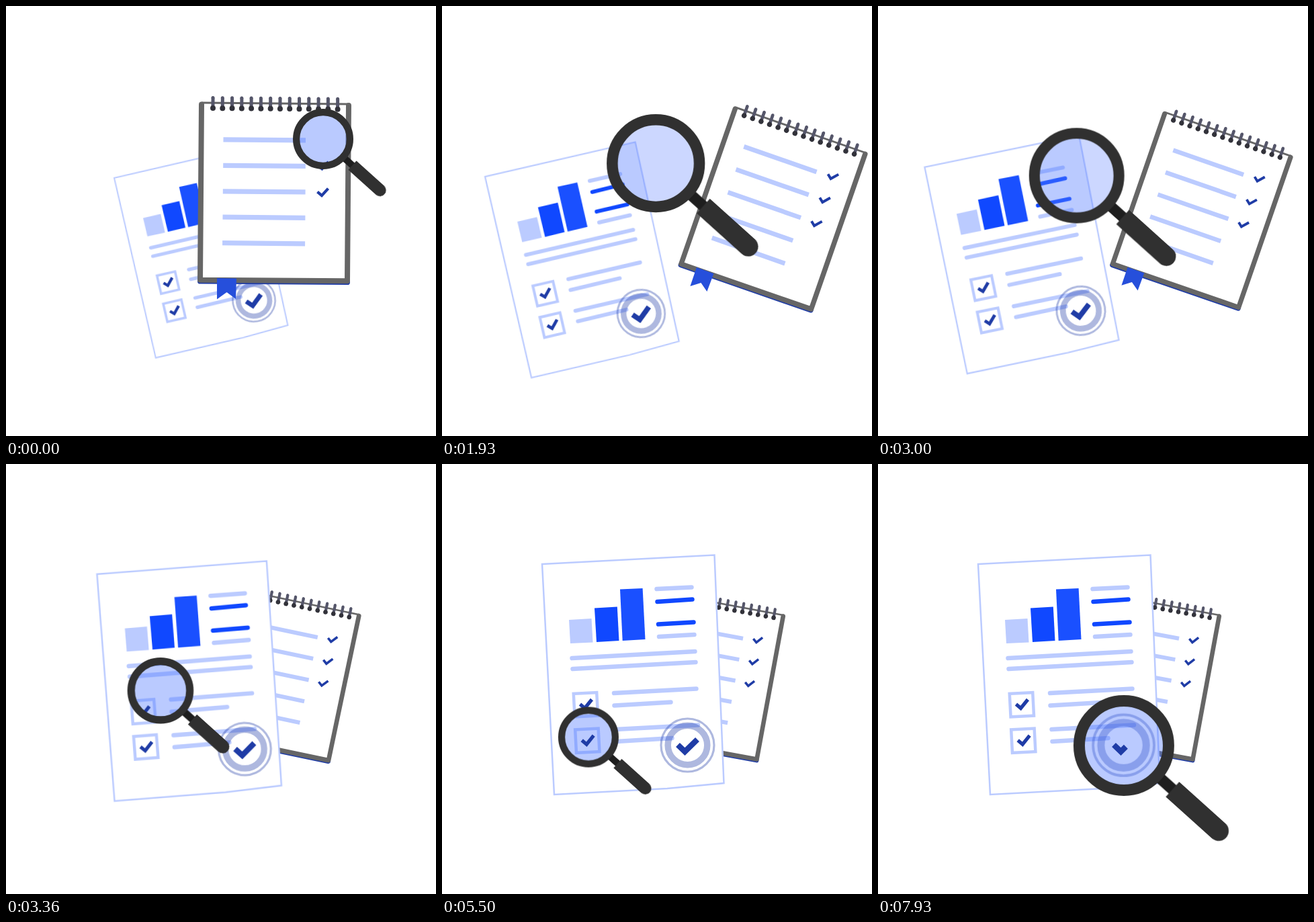
Recreate the animation shown at these times as an HTML page. Size 640x640 px, loop 8000 ms.

```html
<!DOCTYPE html>
<html lang="en">
<head>
<meta charset="utf-8">
<title>Document review</title>
<style>
  :root {
    --light: #bbcbff;
    --blue: #1048ff;
    --navy: #1f3ca6;
    --ease: cubic-bezier(.75, 0, 0, 1);
  }
  html, body { margin: 0; width: 100%; height: 100%; overflow: hidden; background: #fff; }
  svg { position: absolute; inset: 0; width: 100%; height: 100%; }
  path, circle { fill: none; }

  /* stacking */
  #notebookLayer { animation: stack 8s step-end infinite; }
  #paperLayer { z-index: 2; }
  #tintLayer { z-index: 4; opacity: .4; }
  #tickLayer { z-index: 5; }
  #lensLayer { z-index: 6; }
  @keyframes stack { 0% { z-index: 3 } 31%, 100% { z-index: 1 } }

  /* motion */
  .paper { transform-origin: 284.25px 312px; animation: paper 8s infinite var(--ease); }
  @keyframes paper {
    0%, 11.19% { transform: translate(6px, 53.5px) rotate(-10deg) scale(.8) }
    31% { transform: translate(-81.3px, 65.3px) rotate(-10deg) scale(.9) }
    51.375%, 100% { transform: translate(0px, 0px) rotate(0deg) scale(1) }
  }

  .notebook {
    transform-origin: 399.4px 278.3px;
    animation: bookMove 8s infinite var(--ease), bookTurn 8s infinite var(--ease), bookSize 8s infinite var(--ease);
  }
  @keyframes bookMove {
    0% { translate: 0px 0px }
    11.19% { translate: 0px 0px; animation-timing-function: cubic-bezier(.89, 0, 0, 1) }
    27.5%, 31% { translate: 95px 24.6px }
    51.375%, 100% { translate: -.7px 38.7px }
  }
  @keyframes bookTurn {
    0%, 11.19% { rotate: 0deg }
    31% { rotate: 20deg }
    51.375%, 100% { rotate: 10deg }
  }
  @keyframes bookSize {
    0% { scale: 1 }
    11.19% { scale: 1; animation-timing-function: cubic-bezier(.75, 0, .39, 1) }
    31% { scale: .917 }
    51.375%, 100% { scale: .829 }
  }

  .lens { animation: lens 8s infinite var(--ease); }
  @keyframes lens {
    0%, 11.19% { transform: translate(472px, 198px) scale(.6) }
    31% { transform: translate(308px, 236.5px) scale(1) }
    51.375%, 55.725% { transform: translate(217px, 354px) scale(.6) }
    76.1%, 80.875% { transform: translate(218px, 410.4px) scale(.6) }
    100% { transform: translate(366px, 419px) scale(1) }
  }

  /* the seal swells under the lens */
  .seal { transform-origin: 365.5px 418.5px; animation: seal 8s infinite ease-in-out; }
  @keyframes seal { 0%, 91% { transform: scale(1) } 99%, 100% { transform: scale(1.15) } }

  /* ticks redraw when the lens reaches them */
  .tick { stroke: var(--navy); stroke-dasharray: 1 2; }
  .first { animation: tickFirst 8s linear infinite; }
  .boxA { animation: tickA 8s linear infinite; }
  .boxB { animation: tickB 8s linear infinite; }
  .sealTick { animation: tickSeal 8s linear infinite; }
  @keyframes tickFirst { 0%, 2.5% { stroke-dashoffset: 1 } 6%, 100% { stroke-dashoffset: 0 } }
  @keyframes tickA { 0%, 50.5% { stroke-dashoffset: 0 } 50.51% { stroke-dashoffset: 1 } 54%, 100% { stroke-dashoffset: 0 } }
  @keyframes tickB { 0%, 75.5% { stroke-dashoffset: 0 } 75.51% { stroke-dashoffset: 1 } 79%, 100% { stroke-dashoffset: 0 } }
  @keyframes tickSeal { 0%, 96.875% { stroke-dashoffset: 0 } 96.88% { stroke-dashoffset: 1 } 100% { stroke-dashoffset: .15 } }

  .rule { stroke: var(--light); stroke-width: 6.5; stroke-linecap: round; }
  .strong { stroke: var(--blue); }
</style>
</head>
<body>

<svg id="paperLayer" viewBox="0 0 640 640">
  <g class="paper">
    <path d="M149 149L405.5 135.5L419.5 475L335 483L167 492Z" style="fill:#fff" stroke="#bbcbff" stroke-width="2.5"/>
    <path d="M189 232L222.5 230L224.5 265.5L191 267Z" style="fill:var(--light)"/>
    <path d="M227 214.5L260.8 212.5L263.5 263L230 265Z" style="fill:var(--blue)"/>
    <path d="M265 186.5L298.6 185L302.5 261L268.7 263Z" style="fill:#1a50ff"/>
    <path class="rule" d="M319.5 186L371.5 183.5M323 257L375.5 254
      M193.5 289L376.5 279M194.5 305L377.5 295
      M256 341L378.5 334.5M256.5 359.5L340.5 354.5
      M258.5 395L381 388.5M259.5 413L342.5 408"/>
    <path class="rule strong" d="M320.5 205L372.5 201.5M322 238.5L374.5 235.5"/>
    <g stroke="#bbcbff" stroke-width="4.5" fill="none">
      <rect x="-17.25" y="-17.25" width="34.5" height="34.5" transform="translate(213.9 358.2) rotate(-3)"/>
      <rect x="-17.25" y="-17.25" width="34.5" height="34.5" transform="translate(216.3 411.8) rotate(-3)"/>
    </g>
    <g class="seal" stroke="#1f3ca6" opacity=".36">
      <circle cx="365.5" cy="418.5" r="39.5" stroke-width="3.2"/>
      <circle cx="365.5" cy="418.5" r="29.3" stroke-width="9.5"/>
    </g>
  </g>
</svg>

<svg id="notebookLayer" viewBox="0 0 640 640">
  <g class="notebook">
    <path d="M291 145L510 147L508 409.5L289 408Z" style="fill:#fff"/>
    <path d="M289 409.6L508 411.1" stroke="#1f3ca6" stroke-width="8" stroke-linecap="round"/>
    <path d="M291 144L510 146" stroke="#666" stroke-width="3"/>
    <path d="M291 146.5L289 407.8L508 409.3L510 148" stroke="#666" stroke-width="8" stroke-linecap="round" stroke-linejoin="round"/>
    <path d="M314 405L343 405.5L342 436L328.5 426L314 436.5Z" style="fill:#264fdb"/>
    <g stroke="#55566a">
      <path d="M308 136.5L494 138.2" stroke-width="5" stroke-linecap="round" stroke-dasharray="0 14.28"/>
      <path d="M305.5 143.8L496.3 145.5" stroke-width="14.5" stroke-dasharray="5 9.28"/>
    </g>
    <path d="M308 152L494 153.7" stroke="#32323a" stroke-width="8" stroke-linecap="round" stroke-dasharray="0 14.28"/>
    <path d="M323.5 198.8L446 199.9M323.2 237.3L445.8 238.4M322.8 275.8L445.6 276.9M322.5 314.2L445.4 315.4M322.1 352.6L445.1 353.9" stroke="#bbcbff" stroke-width="7.3"/>
  </g>
</svg>

<svg id="tintLayer" viewBox="0 0 640 640">
  <clipPath id="glass"><circle class="lens" r="62"/></clipPath>
  <g clip-path="url(#glass)">
    <rect width="640" height="640" fill="#7f9bff"/>
    <path class="paper" d="M149 149L405.5 135.5L419.5 475L335 483L167 492Z" style="fill:#537aff"/>
    <path class="notebook" d="M288 143L513 145L511 413L286 411Z" style="fill:#537aff"/>
  </g>
</svg>

<svg id="tickLayer" viewBox="0 0 640 640">
  <g class="paper" stroke-width="5.2">
    <path class="tick boxA" pathLength="1" d="M205.5 357.5L212.5 363.5L223 350.5"/>
    <path class="tick boxB" pathLength="1" d="M208.2 411.2L215.2 417.2L225.7 404.2"/>
    <path class="tick sealTick" pathLength="1" stroke-width="8.5" d="M351 418L361.5 428L380 410"/>
  </g>
  <g class="notebook" stroke-width="4.2">
    <path class="tick first" pathLength="1" d="M464.3 197.3L470.8 202.8L480.3 192.3"/>
    <path class="tick" pathLength="1" d="M463.9 236.9L470.4 242.4L479.9 231.9"/>
    <path class="tick" pathLength="1" d="M463.5 276.6L470 282.1L479.5 271.6"/>
  </g>
</svg>

<svg id="lensLayer" viewBox="0 0 640 640">
  <g class="lens">
    <g transform="rotate(42)">
      <path d="M70 0H100" stroke="#1e1e1e" stroke-width="16.8"/>
      <path d="M97.5 -15H190A15 15 0 0 1 190 15H97.5Z" style="fill:#303030"/>
    </g>
    <circle r="66.5" stroke="#303030" stroke-width="17"/>
  </g>
</svg>

</body>
</html>
```
